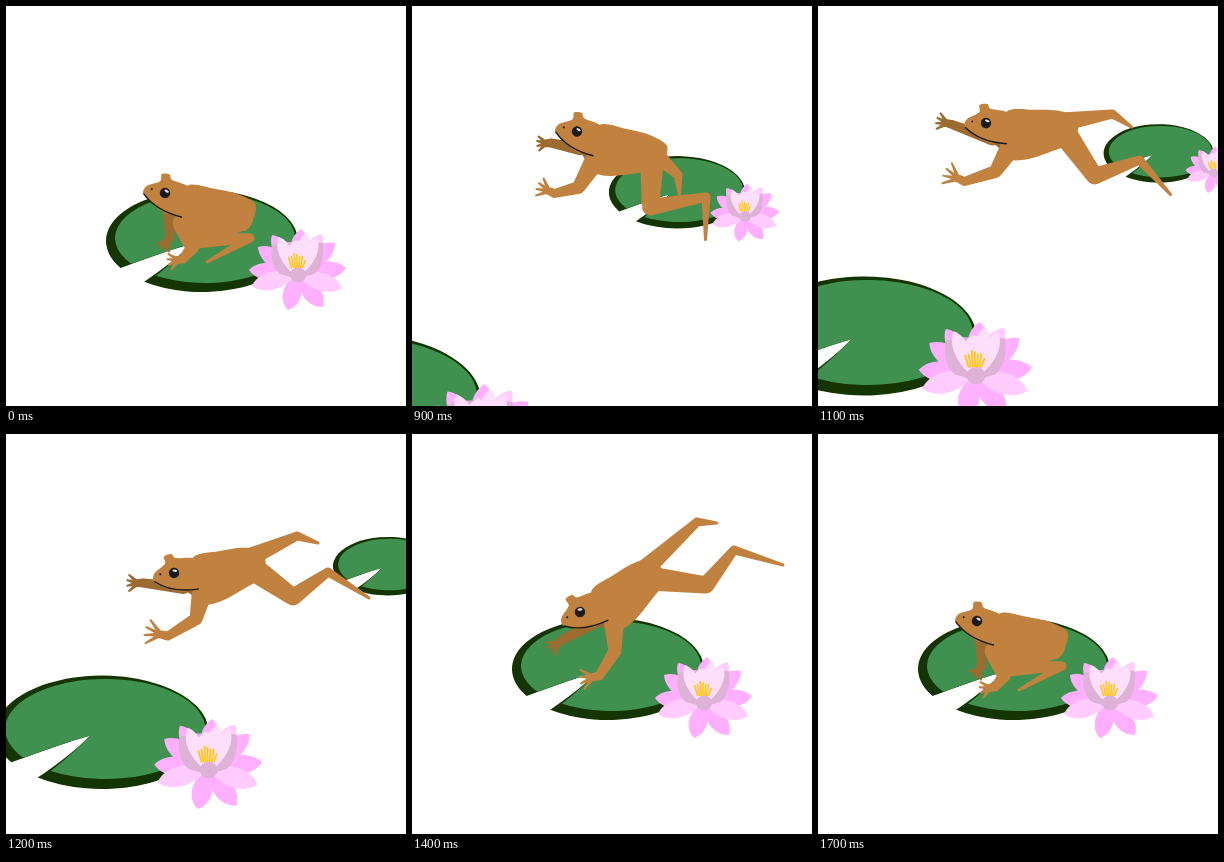
Write an HTML page that moves like this. It is 400 by 400 pixels and loops after 1800 ms.

```html
<!DOCTYPE html>
<html lang="en">
<head>
<meta charset="utf-8">
<title>Leaping frog</title>
<style>
html, body { margin: 0; width: 100%; height: 100%; overflow: hidden; background: #fff; }
svg { display: block; width: 100vw; height: 100vh; }
</style>
</head>
<body>
<svg viewBox="0 0 400 400">
  <defs><g id="lily"></g></defs>
  <use id="padA" href="#lily"/>
  <use id="padB" href="#lily"/>
  <g id="frog"></g>
</svg>
<script>
const NS = 'http://www.w3.org/2000/svg';
const $ = id => document.getElementById(id);
const BROWN = '#c1813f', SHADE = '#9c6b30', INK = '#1c1a1a';
const PINK = '#ffafff', PALE = '#ffccfd', LIGHT = '#fddffb', MAUVE = '#deb1d6';

function add(parent, tag, attrs) {
  const el = document.createElementNS(NS, tag);
  for (const k in attrs) el.setAttribute(k, attrs[k]);
  parent.appendChild(el);
  return el;
}
const mix = (a, b, k) => a + (b - a) * k;
const mixPt = (a, b, k) => a.map((v, i) => mix(v, b[i], k));
const spin = ([x, y], deg, [ox, oy]) => {
  const a = deg * Math.PI / 180, c = Math.cos(a), s = Math.sin(a);
  return [ox + x * c - y * s, oy + x * s + y * c];
};

// Lily pad and flower, drawn at their resting place
const lily = $('lily');

function leaf(fill, cx, cy, rx, ry, from, to) {
  const rim = deg => {
    const a = deg * Math.PI / 180;
    return [cx + rx * Math.cos(a), cy + ry * Math.sin(a)];
  };
  add(lily, 'path', { fill, d: `M${rim(from)}A${rx} ${ry} 0 1 1 ${rim(to)}Q170 254 185 238Q166 243 ${rim(from)}Z` });
}
leaf('#143400', 196, 235, 96, 51, 148, 127);
leaf('#409150', 199, 232, 90, 45, 145, 123);

function petal(x, y, w, fill, cx = 291, cy = 268) {
  const dx = x - cx, dy = y - cy, len = Math.hypot(dx, dy);
  const nx = -dy / len * w, ny = dx / len * w;
  const side = (k, s) => `${cx + dx * k + nx * s} ${cy + dy * k + ny * s}`;
  add(lily, 'path', { fill, d: `M${cx} ${cy}C${side(.35, 1)} ${side(.8, 1)} ${x} ${y}C${side(.8, -1)} ${side(.35, -1)} ${cx} ${cy}Z` });
}
petal(295, 223, 12, PINK);
petal(252, 241, 12, PINK);
petal(329, 237, 12, PINK);
petal(340, 262, 12, PINK);
petal(243, 264, 12, PINK);
petal(282, 304, 12, PINK);
petal(317, 301, 12, PINK);
petal(246, 280, 12, PALE);
petal(336, 282, 12, PALE);
petal(266, 229, 11, PINK);
petal(316, 228, 11, PALE);
add(lily, 'path', { fill: MAUVE, d: 'M266 239Q263 259 274 268L291 273L308 268Q319 260 317 237L303 236H280Z' });
petal(273, 231, 9, LIGHT, 289, 269);
petal(311, 232, 9, LIGHT, 294, 269);
petal(300, 227, 9, LIGHT, 293, 268);
petal(290, 234, 14, LIGHT);
for (let i = -3; i <= 3; i++) {
  const y = 248 + i * i * .5 + i % 2 * 1.5;
  add(lily, 'path', { fill: 'none', stroke: '#ffc60a', 'stroke-width': 1.5, d: `M${291 + i * 1.8} 262L${291 + i * 2.8} ${y}` });
}
add(lily, 'ellipse', { cx: 292, cy: 269, rx: 8, ry: 7.5, fill: MAUVE });

// Head and torso outlines around the eye, both facing left
const HEAD = [[-20, 9], [-19, 2], [-10, -8], [-12, -15], [-5, -18.5], [0, -15], [17, -17], [28, -8], [27, 10], [14, 17], [1, 17], [-15, 13]];
const TORSO = [[10, 8], [21, -14], [48, -17], [70, -18], [90, -13], [92, 3], [88, 15], [75, 20], [44, 33], [22, 33]];

// Key poses: step number, head and torso tilt, then joints in stage coordinates
const pose = (at, head, torso, eye, leg, farLeg, arm, farArm) => ({ at, tilt: [head, torso], eye: [eye], leg, farLeg, arm, farArm });
const sit = at => pose(at, 29, 15, [159, 187], [[192, 234], [244, 232], [201, 256]], [[225, 225], [215, 230]],
  [[186, 242], [177, 253], [162, 256]], [[164, 231], [156, 243]]);
const poses = [
  sit(0),
  pose(1, 29, 19, [162, 156], [[211, 225], [267, 212], [245, 254]], [[234, 224], [220, 245]],
    [[168, 217], [154, 226], [137, 225]], [[147, 186], [134, 195]]),
  pose(3, 31, 15, [168, 95], [[266, 177], [321, 170], [342, 213]], [[298, 114], [315, 133]],
    [[165, 146], [131, 149], [114, 135]], [[131, 88], [116, 80]]),
  pose(5, 7, -6, [168, 139], [[287, 163], [322, 138], [363, 164]], [[291, 102], [312, 109]],
    [[190, 185], [162, 202], [139, 197]], [[137, 149], [121, 149]]),
  pose(6, -8, -18, [171, 161], [[293, 156], [321, 123], [369, 137]], [[284, 95], [304, 97]],
    [[202, 200], [181, 224], [156, 225]], [[143, 181], [127, 183]]),
  pose(7, -10, -28, [168, 178], [[294, 151], [322, 116], [371, 131]], [[285, 88], [305, 89]],
    [[203, 217], [187, 242], [168, 246]], [[150, 206], [137, 216]]),
  pose(8, -4, -14, [167, 185], [[273, 206], [299, 157], [331, 181]], [[295, 147], [311, 158]],
    [[202, 224], [187, 248], [172, 254]], [[152, 215], [140, 228]]),
  sit(10)
];

const frog = $('frog');
const el = {};
for (const name of ['farArm', 'farLeg', 'torso', 'head', 'throat', 'leg', 'arm']) {
  el[name] = add(frog, 'path', { fill: name === 'farArm' || name === 'throat' ? SHADE : BROWN });
}
const face = add(frog, 'g', {});
add(face, 'path', { fill: 'none', stroke: INK, 'stroke-width': 1.4, 'stroke-linecap': 'round', d: 'M-18 11Q0 20 26 13' });
add(face, 'circle', { cx: -13.5, cy: 3, r: 1, fill: INK });
add(face, 'circle', { r: 5.2, fill: INK });
add(face, 'ellipse', { cx: .5, cy: -2.4, rx: 2.4, ry: 1.2, fill: '#ddd' });

// Closed smooth curve through the points
function smooth(pts) {
  const n = pts.length, at = i => pts[(i + n) % n];
  let d = 'M' + pts[0];
  for (let i = 0; i < n; i++) {
    const p = at(i - 1), a = at(i), b = at(i + 1), q = at(i + 2);
    const c1 = a.map((v, j) => v + (b[j] - p[j]) / 7);
    const c2 = b.map((v, j) => v - (q[j] - a[j]) / 7);
    d += `C${c1} ${c2} ${b}`;
  }
  return d + 'Z';
}

// Tapered limb: a disc at each joint, joined by straight sides
function limb(pts, radii) {
  let d = '';
  pts.forEach(([x, y], i) => {
    const r = radii[i];
    d += `M${x - r} ${y}a${r} ${r} 0 1 0 ${2 * r} 0a${r} ${r} 0 1 0 ${-2 * r} 0Z`;
    if (i === pts.length - 1) return;
    const [u, v] = pts[i + 1], q = radii[i + 1], len = Math.hypot(u - x, v - y) || 1;
    const nx = (y - v) / len, ny = (u - x) / len;
    d += `M${x + nx * r} ${y + ny * r}L${u + nx * q} ${v + ny * q}L${u - nx * q} ${v - ny * q}L${x - nx * r} ${y - ny * r}Z`;
  });
  return d;
}

// Four fingers fanned around the line from wrist to middle fingertip
function hand(wrist, tip) {
  const reach = [tip[0] - wrist[0], tip[1] - wrist[1]];
  const palm = mixPt(wrist, tip, .3);
  let d = limb([wrist, palm], [4.5, 4]);
  for (let i = 0; i < 4; i++) d += limb([palm, spin(reach, (i - 1.5) * 20, wrist)], [2.2, 1]);
  return d;
}

function drawFrog(step) {
  const i = Math.max(1, poses.findIndex(p => p.at >= step));
  const a = poses[i - 1], b = poses[i], k = (step - a.at) / (b.at - a.at);
  const joints = name => a[name].map((p, n) => mixPt(p, b[name][n], k));
  const [head, torso] = mixPt(a.tilt, b.tilt, k);
  const [eye] = joints('eye');
  const onTorso = p => spin(p, torso, eye), onHead = p => spin(p, head, eye);
  const [elbow, wrist, tip] = joints('arm');
  const [farWrist, farTip] = joints('farArm');
  const paths = {
    head: smooth(HEAD.map(onHead)),
    torso: smooth(TORSO.map(onTorso)),
    throat: 'M' + [[12, 16], [26, 13], [24, 21]].map(onHead).join('L') + 'Z',
    leg: limb([onTorso([80, 5]), ...joints('leg')], [12, 8.5, 4.5, 1.5]),
    farLeg: limb([onTorso([72, -6]), ...joints('farLeg')], [10, 4.5, 1.5]),
    arm: limb([onTorso([25, 25]), elbow, wrist], [10, 6.5, 4.5]) + hand(wrist, tip),
    farArm: limb([onTorso([8, 16]), farWrist], [6, 4.5]) + hand(farWrist, farTip)
  };
  for (const name in paths) el[name].setAttribute('d', paths[name]);
  face.setAttribute('transform', `translate(${eye}) rotate(${head})`);
}

function place(node, shown, x, y, s) {
  node.style.display = shown ? '' : 'none';
  node.setAttribute('transform', `translate(${x} ${y}) scale(${s}) translate(-100 -184)`);
}

// A rest of 800 ms, then ten steps of 100 ms
function draw(t) {
  const step = Math.max(0, Math.floor((t - 700) / 100));
  const left = Math.max(0, 7 - step);
  place($('padA'), step < 7, 100 + 50.4 * step - step * step, 184 - 17.5 * step + .26 * step * step, Math.max(.573, 1 - .145 * step));
  place($('padB'), step > 0, 100 - 55.4 * left, 184 + 28.8 * left, 1 + .056 * left);
  drawFrog(step);
}

const start = performance.now();
function tick() {
  draw((performance.now() - start) % 1800);
  requestAnimationFrame(tick);
}
tick();
</script>
</body>
</html>
```
